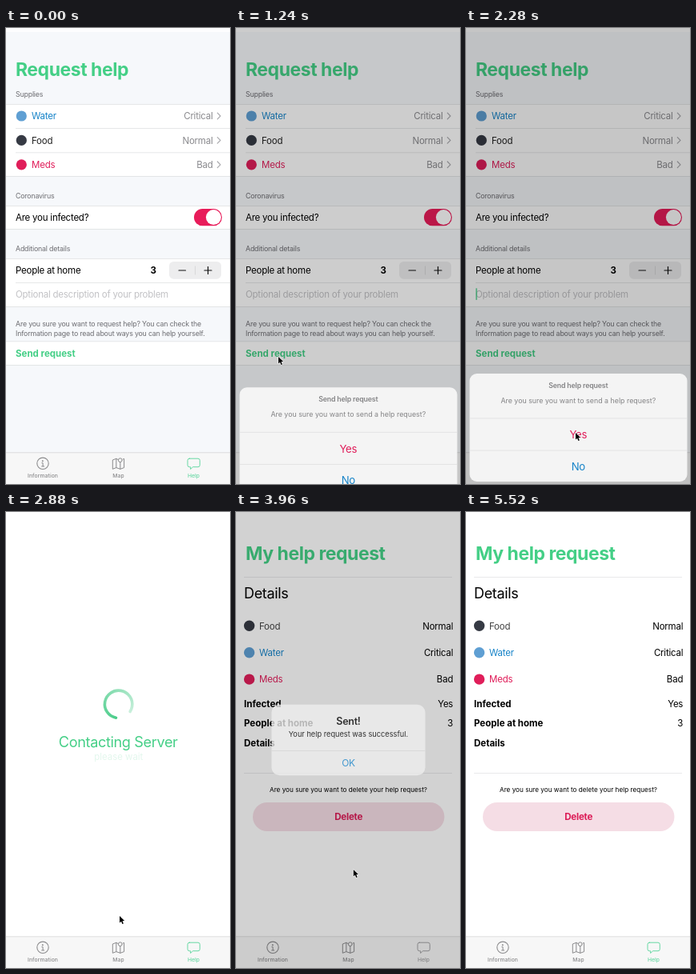
An HTML page with a canvas that plays this animation: 280x570 px, repeating every 6.44 s.

```html
<!DOCTYPE html>
<html lang="en">
<head>
<meta charset="utf-8">
<title>Request help</title>
<style>
html, body { margin: 0; width: 100%; height: 100%; overflow: hidden; background: #fff; }
canvas { display: block; width: 280px; height: 570px; }
</style>
</head>
<body>
<canvas id="stage"></canvas>
<script>
const W = 280, H = 570, LOOP = 6440;
const GREEN = '#44cf86', RED = '#e01e5a', BLUE = '#1683c8', SKY = '#5f9fd3', INK = '#363a44';
const GREY = '#8a8a8e', NOTE = '#6d6d72', LINE = '#dcdddf', TINT = '#68d8a4';
const BOLD = { weight: 700, track: 0 };
const CENTER = { align: 'center' };
const canvas = document.getElementById('stage');
const ctx = canvas.getContext('2d');
const dpr = window.devicePixelRatio || 1;
canvas.width = W * dpr;
canvas.height = H * dpr;

const clamp = v => Math.max(0, Math.min(1, v));
const ramp = (t, from, to) => clamp((t - from) / (to - from));
const easeOut = p => 1 - (1 - p) ** 3;
const easeInOut = p => p * p * (3 - 2 * p);

function text(str, x, y, size, color, { weight = 400, align = 'left', track = -0.02 } = {}) {
  ctx.font = `${weight} ${size}px Inter, Roboto, sans-serif`;
  ctx.letterSpacing = `${track * size}px`;
  ctx.textAlign = align;
  ctx.fillStyle = color;
  ctx.fillText(str, x, y);
}

function rect(x, y, w, h, color) {
  ctx.fillStyle = color;
  ctx.fillRect(x, y, w, h);
}

function pill(x, y, w, h, r, color) {
  ctx.fillStyle = color;
  ctx.beginPath();
  ctx.roundRect(x, y, w, h, r);
  ctx.fill();
}

function dot(x, y, r, color) {
  ctx.fillStyle = color;
  ctx.beginPath();
  ctx.arc(x, y, r, 0, 7);
  ctx.fill();
}

function path(points, color, width) {
  ctx.strokeStyle = color;
  ctx.lineWidth = width;
  ctx.lineJoin = ctx.lineCap = 'round';
  ctx.beginPath();
  points.forEach(([x, y]) => ctx.lineTo(x, y));
  ctx.stroke();
}

const hair = (x, y, w, color = LINE) => rect(x, y, w, 0.7, color);

function whiteRows(top, bottom) {
  rect(0, top, W, bottom - top, '#fff');
  hair(0, top, W);
  hair(0, bottom, W);
}

function tabBar(grey) {
  const tone = '#8b8b8d';
  rect(0, 531, W, 39, '#f7f7f7');
  hair(0, 530.5, W, '#cfcfcf');
  // information
  ctx.strokeStyle = tone;
  ctx.lineWidth = 1.1;
  ctx.beginPath();
  ctx.arc(46, 544.3, 7.2, 0, 7);
  ctx.stroke();
  dot(45.8, 541.2, 1, tone);
  path([[44.7, 543.7], [46.1, 543.7], [46.1, 547.8]], tone, 1);
  path([[44.5, 547.9], [47.7, 547.9]], tone, 1);
  // map
  path([[140, 539.5], [137.8, 538.3], [133.3, 540], [133.3, 551.3], [137.8, 549.6], [142.8, 551.3],
    [147.6, 549.6], [147.6, 538.4], [146.5, 538.8]], tone, 1);
  path([[137.8, 538.3], [137.8, 549.6]], tone, 1);
  path([[142.8, 542.5], [142.8, 551.3]], tone, 1);
  ctx.beginPath();
  ctx.arc(142.8, 540.2, 2.4, 0, 7);
  ctx.stroke();
  // help
  helpTab(TINT, 1 - grey);
  helpTab('#a2a2a4', grey);
  const label = { weight: 500, align: 'center', track: 0.01 };
  text('Information', 46, 562, 6.8, tone, label);
  text('Map', 140.5, 562, 6.8, tone, label);
}

function helpTab(color, alpha) {
  if (alpha <= 0) return;
  ctx.globalAlpha = alpha;
  ctx.strokeStyle = color;
  ctx.lineWidth = 1;
  ctx.lineJoin = 'round';
  ctx.beginPath();
  ctx.moveTo(229.2, 538.2);
  ctx.arcTo(242.3, 538.2, 242.3, 548.7, 2.3);
  ctx.arcTo(242.3, 548.7, 234, 548.7, 2.3);
  ctx.lineTo(233.6, 548.7);
  ctx.lineTo(230.6, 551.5);
  ctx.lineTo(230.6, 548.7);
  ctx.arcTo(227, 548.7, 227, 543, 2.3);
  ctx.arcTo(227, 538.2, 230, 538.2, 2.3);
  ctx.closePath();
  ctx.stroke();
  text('Help', 234.5, 562, 6.8, color, { weight: 500, align: 'center', track: 0.01 });
  ctx.globalAlpha = 1;
}

function formScreen(caret) {
  rect(0, 0, W, H, '#f6f8fb');
  rect(0, 0, W, 5, '#fdfdfe');
  text('Request help', 12, 60, 23, GREEN, { weight: 700 });

  text('Supplies', 12, 86, 8.8, NOTE);
  whiteRows(95, 185);
  [['Water', 'Critical', SKY, BLUE], ['Food', 'Normal', INK, '#222'], ['Meds', 'Bad', RED, RED]]
    .forEach(([name, level, mark, ink], i) => {
      const y = 110 + i * 30.4;
      dot(19.3, y, 6.6, mark);
      text(name, 32, y + 4.2, 11.5, ink);
      text(level, 258.5, y + 4.2, 11.5, GREY, { align: 'right' });
      path([[264.3, y - 3.8], [268, y], [264.3, y + 3.8]], '#a9a9ad', 1.2);
      if (i) hair(12, y - 15.3, W - 12);
    });

  text('Coronavirus', 12, 212.5, 8.8, NOTE);
  whiteRows(222, 251);
  text('Are you infected?', 12, 241, 11.5, '#000');
  pill(235, 226, 35, 21.3, 10.6, '#e81c5a');
  dot(259.4, 236.6, 9.5, '#fff');

  text('Additional details', 12, 278.7, 8.8, NOTE);
  whiteRows(288, 348);
  hair(12, 318, W - 12);
  text('People at home', 12, 307, 11.5, '#000');
  text('3', 184, 307, 11.5, '#000', { weight: 700, align: 'center' });
  pill(204, 292, 65, 21.7, 5.5, '#ededee');
  rect(236.2, 297.5, 0.8, 11, '#d2d2d4');
  path([[216, 303], [224.5, 303]], '#111', 1.2);
  path([[248, 303], [257, 303]], '#111', 1.2);
  path([[252.5, 298.5], [252.5, 307.5]], '#111', 1.2);
  text('Optional description of your problem', 12, 337, 11.5, '#c2c2c5');
  ctx.globalAlpha = caret;
  rect(12.4, 325.3, 1.3, 14.6, GREEN);
  ctx.globalAlpha = 1;

  text('Are you sure you want to request help? You can check the', 12, 373, 8.8, NOTE);
  text('Information page to read about ways you can help yourself.', 12, 384.7, 8.8, NOTE);
  whiteRows(391.5, 421);
  text('Send request', 12, 411, 11.5, GREEN, BOLD);
  tabBar(0);
}

function loadingScreen(t) {
  rect(0, 0, W, H, '#fff');
  const start = 100 + (t - 2880) * 0.36;
  const rad = d => d * Math.PI / 180;
  const sweep = 292, turn = rad(start);
  const shade = ctx.createConicGradient(turn, 140.6, 240.3);
  shade.addColorStop(0, 'rgb(76,205,139)');
  shade.addColorStop(sweep / 360, 'rgb(200,239,219)');
  shade.addColorStop(0.9, 'rgb(200,239,219)');
  shade.addColorStop(0.901, 'rgb(76,205,139)');
  ctx.strokeStyle = shade;
  ctx.lineWidth = 3.6;
  ctx.lineCap = 'round';
  ctx.beginPath();
  ctx.arc(140.6, 240.3, 17.2, turn, rad(start + sweep));
  ctx.stroke();
  text('Contacting Server', 140.2, 294, 18.1, GREEN, CENTER);
  text('please wait', 140.8, 310, 11.4, '#e3f7ed', { align: 'center', track: 0 });
  tabBar(0);
}

function requestScreen(grey) {
  rect(0, 0, W, H, '#fff');
  text('My help request', 12, 59.5, 23, GREEN, { weight: 700 });
  hair(10, 81.3, 260, '#e0e0e2');
  text('Details', 10, 107.6, 18, '#000');
  [['Food', 'Normal', INK, '#444'], ['Water', 'Critical', SKY, BLUE], ['Meds', 'Bad', RED, RED]]
    .forEach(([name, level, mark, ink], i) => {
      const y = 142.3 + i * 33.4;
      dot(16.6, y, 6.7, mark);
      text(name, 29, y + 4.2, 11.5, ink);
      text(level, 271.2, y + 4.2, 11.5, '#000', { align: 'right' });
    });
  [['Infected', 'Yes'], ['People at home', '3'], ['Details', '']].forEach(([name, value], i) => {
    const y = 243.5 + i * 24.8;
    text(name, 10, y, 11.5, '#000', BOLD);
    text(value, 271.2, y, 11.5, '#000', { align: 'right' });
  });
  hair(10, 326, 260, '#e0e0e2');
  text('Are you sure you want to delete your help request?', 140.5, 349.7, 8.2, '#000', { align: 'center', track: 0 });
  pill(21, 363, 239.5, 36, 18, '#f5dde5');
  text('Delete', 140.7, 385, 11.6, '#dc1d58', { weight: 700, align: 'center' });
  tabBar(grey);
}

function dim(amount) {
  rect(0, 0, W, H, `rgba(0,0,0,${0.225 * amount})`);
}

function actionSheet(shift) {
  ctx.save();
  ctx.translate(0, shift);
  pill(4.5, 432, 272, 135, 9, '#f4f4f4');
  text('Send help request', 140.3, 450, 8.8, '#848486', { weight: 600, align: 'center' });
  text('Are you sure you want to send a help request?', 140.3, 469, 8.85, '#848486', { align: 'center', track: 0 });
  hair(4.5, 487.6, 272, '#dadadb');
  hair(4.5, 527.7, 272, '#dadadb');
  text('Yes', 140.3, 513.4, 13.2, RED, CENTER);
  text('No', 140.3, 552.6, 13.2, BLUE, CENTER);
  ctx.restore();
}

function alertBox(alpha, scale) {
  ctx.save();
  ctx.globalAlpha = alpha;
  ctx.translate(140.5, 285);
  ctx.scale(scale, scale);
  ctx.translate(-140.5, -285);
  pill(48, 242.5, 185, 85, 9.5, 'rgba(240,240,240,0.97)');
  text('Sent!', 140.5, 267, 12, '#000', { weight: 600, align: 'center' });
  text('Your help request was successful.', 140.5, 280.8, 8.9, '#000', { align: 'center', track: 0 });
  hair(48, 297.6, 185, '#cfcfd1');
  text('OK', 140.5, 317, 11.5, BLUE, CENTER);
  ctx.restore();
}

// time, x, y of the pointer tip
const route = [
  [300, 112, 596], [760, 53, 411], [1680, 53, 411], [2120, 137, 506], [2360, 137, 506],
  [2800, 142, 505], [3080, 142, 505], [3800, 147, 469], [4400, 146, 345], [4680, 142.5, 308],
  [5000, 142.5, 308], [5440, 292, 350]
];

function pointer(t) {
  const i = route.findIndex(stop => t < stop[0]);
  if (i < 1) return;
  const [t0, x0, y0] = route[i - 1], [t1, x1, y1] = route[i];
  const p = easeInOut(ramp(t, t0, t1));
  ctx.save();
  ctx.translate(x0 + (x1 - x0) * p, y0 + (y1 - y0) * p);
  ctx.beginPath();
  [[0, 0], [0, 8.6], [2, 6.8], [3.4, 10], [4.9, 9.4], [3.5, 6.2], [6.1, 6.1]]
    .forEach(([x, y]) => ctx.lineTo(x, y));
  ctx.closePath();
  ctx.strokeStyle = '#fff';
  ctx.lineWidth = 1.1;
  ctx.lineJoin = 'round';
  ctx.stroke();
  ctx.fillStyle = '#000';
  ctx.fill();
  ctx.restore();
}

function draw(t) {
  const sheetIn = easeOut(ramp(t, 1000, 1482));
  const sheetOut = easeInOut(ramp(t, 2340, 2680));
  const alertIn = easeOut(ramp(t, 3800, 4200));
  const alertOut = easeInOut(ramp(t, 5000, 5320));
  const grey = ramp(t, 3730, 3870) * (1 - alertOut);
  const caret = ramp(t, 260, 340) * (1 - ramp(t, 720, 840)) + ramp(t, 1960, 2080);

  if (t < 2400) formScreen(caret);
  else if (t < 3740) loadingScreen(t);
  else requestScreen(grey);

  if (t > 1000 && t < 2680) {
    dim(sheetIn * (1 - sheetOut));
    actionSheet(138 * (1 - sheetIn + sheetOut));
  }
  if (t > 3800 && t < 5320) {
    dim(alertIn * (1 - alertOut));
    alertBox(alertIn * (1 - alertOut), 1.18 - 0.18 * alertIn);
  }
  pointer(t);
}

function frame() {
  ctx.setTransform(dpr, 0, 0, dpr, 0, 0);
  draw(performance.now() % LOOP);
  requestAnimationFrame(frame);
}
frame();
</script>
</body>
</html>
```
